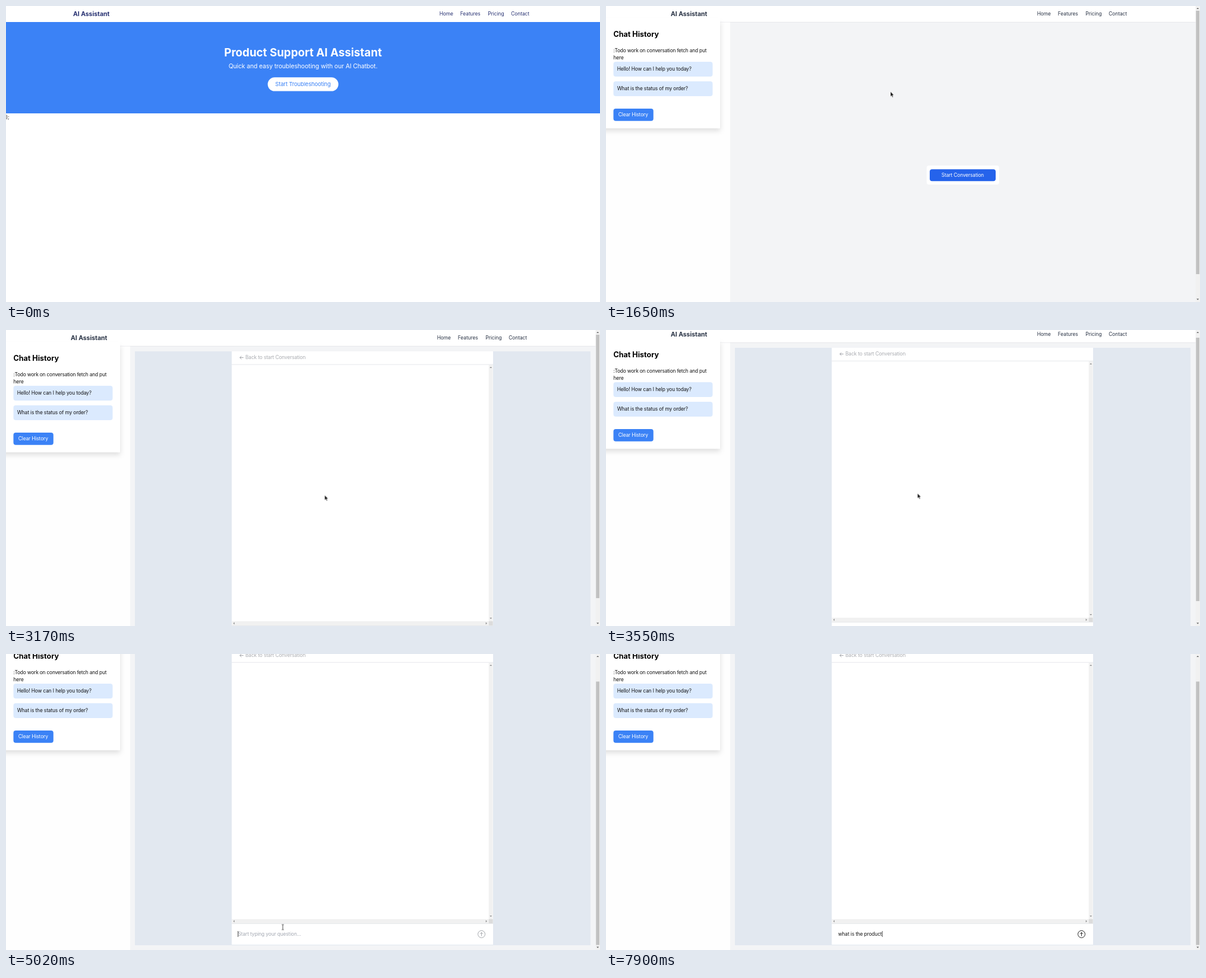
An HTML page that plays this animation: 1000 px wide and 499 px high, repeating every 8000 ms.

```html
<!DOCTYPE html>
<html lang="en">
<head>
<meta charset="utf-8">
<title>Support chat</title>
<style>
html, body { margin: 0; width: 100%; height: 100%; overflow: hidden; background: #fff; }
svg { display: block; width: 1000px; height: 499px; font: 8.33px Inter, sans-serif; letter-spacing: -.013em; }
.brand { font-size: 10.4px; font-weight: 700; letter-spacing: 0; }
.nav { letter-spacing: -.003em; }
.mid { text-anchor: middle; }
.typed { white-space: pre; }

/* one 8 s loop for everything; on/off parts switch hard */
.home, .app, .start, .chat, .idle, .busy, .hint, .caret, .cursor > g { animation: 8s step-end infinite; }
.home { animation-name: home; }
.app { animation-name: app; }
.start { animation-name: start; }
.chat { animation-name: chat; }
.idle { animation-name: idle; }
.busy { animation-name: busy; }
.hint { animation-name: hint; }
.caret { animation-name: caret; }
.cursor .arrow { animation-name: arrow; }
.cursor .hand { animation-name: hand; }
.cursor .beam { animation-name: beam; }
.press { animation: press 8s step-end infinite; }
.send { animation: send 8s step-end infinite; }
.scroll { animation: scroll 8s infinite; }
.thumb { animation: thumb 8s infinite; }
.cursor { animation: move 8s linear infinite; }
.spin { animation: spin 1s linear infinite; transform-origin: 600.5px 285.2px; }

@keyframes home { 0% { opacity: 1 } 19.25%, 100% { opacity: 0 } }
@keyframes app { 0% { opacity: 0 } 19.25%, 100% { opacity: 1 } }
@keyframes start { 0%, 37.5%, 100% { opacity: 0 } 19.25% { opacity: 1 } }
@keyframes chat { 0% { opacity: 0 } 37.5%, 100% { opacity: 1 } }
@keyframes idle { 0% { opacity: 1 } 31.75%, 100% { opacity: 0 } }
@keyframes busy { 0% { opacity: 0 } 31.75%, 100% { opacity: 1 } }
@keyframes press { 0% { fill: #2563eb } 28%, 100% { fill: #1d4ed8 } }
@keyframes hint { 0% { opacity: 1 } 74.625%, 100% { opacity: 0 } }
@keyframes send { 0% { stroke: #a5a8ad } 74.625%, 100% { stroke: #222 } }
@keyframes caret { 0%, 70.125% { opacity: 0 } 54.875%, 74.625%, 100% { opacity: 1 } }
@keyframes arrow { 0%, 10.6%, 28%, 53.5%, 100% { opacity: 0 } 2.5%, 19.25%, 37.5% { opacity: 1 } }
@keyframes hand { 0%, 19.25%, 37.5%, 100% { opacity: 0 } 10.6%, 28% { opacity: 1 } }
@keyframes beam { 0%, 54.875%, 74.625%, 100% { opacity: 0 } 53.5%, 62.75% { opacity: 1 } }
@keyframes scroll {
  0% { transform: none; animation-timing-function: step-end }
  44.375%, 45.5% { transform: translateY(-6px); animation-timing-function: ease-out }
  51.25%, 100% { transform: translateY(-44px) }
}
@keyframes thumb {
  0% { transform: none; animation-timing-function: step-end }
  44.375%, 45.5% { transform: translateY(5px); animation-timing-function: ease-out }
  51.25%, 100% { transform: translateY(38.5px) }
}
@keyframes move {
  0%, 2.5% { transform: translate(545px, 284px); animation-timing-function: ease-out }
  12.125% { transform: translate(478px, 135px) }
  15.875%, 19.25% { transform: translate(475px, 138px); animation-timing-function: ease-in-out }
  28.875%, 29.875% { transform: translate(570px, 291px) }
  31.75%, 33.875% { transform: translate(570px, 287px); animation-timing-function: ease-out }
  44.375%, 45.5% { transform: translate(524.5px, 275.5px); animation-timing-function: ease-in-out }
  51.25%, 53.5% { transform: translate(490px, 440px) }
  54.875%, 100% { transform: translate(466px, 460.5px) }
}
@keyframes spin { to { transform: rotate(360deg) } }
</style>
</head>
<body>
<svg viewBox="0 0 1000 499">
  <defs>
    <g id="menu">
      <text class="brand" x="113" y="17.2">AI Assistant</text>
      <g class="nav">
        <text x="729.7" y="16.1">Home</text>
        <text x="764.8" y="16.1">Features</text>
        <text x="811.3" y="16.1">Pricing</text>
        <text x="850.3" y="16.1">Contact</text>
      </g>
    </g>
    <path id="tip" d="M-2 1.1h4L0-1.1z"/>
  </defs>

  <g class="home">
    <rect width="1000" height="499" fill="#fff"/>
    <use href="#menu" fill="#252f70"/>
    <rect y="27" width="1000" height="154" fill="#3b82f6"/>
    <g class="mid" fill="#fff">
      <text x="500" y="85.3" font-size="18.75" font-weight="700" letter-spacing="0">Product Support AI Assistant</text>
      <text x="500" y="104.6" font-size="10.4">Quick and easy troubleshooting with our AI Chatbot.</text>
      <rect x="440.6" y="120.2" width="119" height="23.4" rx="11.7"/>
      <text x="500" y="135.4" font-size="9.4" fill="#3b82f6">Start Troubleshooting</text>
    </g>
    <text x="0" y="190" fill="#111">);</text>
  </g>

  <g class="app">
    <rect width="1000" height="499" fill="#f3f4f6"/>
    <g class="scroll">
      <rect width="993" height="27" fill="#fff"/>
      <path d="M0 27.3H993" stroke="#e2e4e8" stroke-width=".8"/>
      <use href="#menu" x="-4" fill="#283244"/>
      <rect y="27.6" width="209" height="530" fill="#fefefe"/>
      <rect x="-20" y="24" width="212" height="182.3" fill="#fff" style="filter:drop-shadow(0 4px 4px #0002)"/>
      <rect y="20" width="192" height="12" fill="#fff"/>
      <text x="12.5" y="51.8" font-size="12.5" font-weight="700" letter-spacing="0">Chat History</text>
      <g fill="#111">
        <text x="12.5" y="77.5" letter-spacing="-.17">:Todo work on conversation fetch and put</text>
        <text x="12.5" y="90">here</text>
        <g fill="#dbeafe">
          <rect x="12.5" y="94" width="167" height="25" rx="4"/>
          <rect x="12.5" y="127" width="167" height="25" rx="4"/>
        </g>
        <text x="18.7" y="109">Hello! How can I help you today?</text>
        <text x="18.7" y="142.3">What is the status of my order?</text>
      </g>
      <rect x="12.5" y="173" width="67.3" height="20.7" rx="4" fill="#3b82f6"/>
      <text x="20.8" y="186.2" fill="#fff">Clear History</text>

      <g class="start">
        <rect x="539.8" y="269" width="122" height="32" rx="4" fill="#fff"/>
        <rect class="press" x="545" y="275.2" width="111" height="20" rx="4"/>
        <text class="idle mid" x="600.5" y="288.2" fill="#fff">Start Conversation</text>
        <g class="busy">
          <g class="spin" fill="none" stroke="#fff">
            <circle cx="600.5" cy="285.2" r="2.8" opacity=".5"/>
            <path d="M597.7 285.2a2.8 2.8 0 0 1 2.8-2.8"/>
          </g>
        </g>
      </g>

      <g class="chat">
        <rect x="217" y="36" width="767" height="499" fill="#e2e8f0"/>
        <rect x="380" y="36" width="440" height="498" fill="#fff"/>
        <path d="M399.8 46.5H393.8m2.6-2.7-2.7 2.7 2.7 2.7" fill="none" stroke="#8d9096" stroke-width=".8"/>
        <text x="403" y="49.3" fill="#a9abb0">Back to start Conversation</text>
        <path d="M380 58.2H820M380 498.6H820" stroke="#e5e7eb"/>
        <path d="M812.7 59H819.6V491H812.7zM380.4 491H812.7V498H380.4z" fill="#f1f1f1"/>
        <rect x="812.7" y="491" width="7" height="7" fill="#dcdcdc"/>
        <g fill="#8f8f8f">
          <use href="#tip" x="816.2" y="63"/>
          <use href="#tip" transform="translate(816.2 486) scale(1 -1)"/>
          <use href="#tip" transform="translate(383.6 494.5) rotate(-90)"/>
          <use href="#tip" transform="translate(808.8 494.5) rotate(90)"/>
        </g>
        <text class="hint" x="390.6" y="519" fill="#a3a8b2">Start typing your question...</text>
        <text class="typed" x="390.8" y="519" fill="#111"></text>
        <rect class="caret" y="511" width=".8" height="10" fill="#222"/>
        <g class="send" fill="none">
          <circle cx="800.5" cy="516.3" r="6"/>
          <path d="M800.5 519.4V513.4m-2.4 2.4 2.4-2.4 2.4 2.4"/>
        </g>
      </g>
    </g>

    <rect x="992.5" width="7.5" height="499" fill="#f1f1f1"/>
    <rect class="thumb" x="993.3" y="8" width="5.7" height="444" fill="#c1c1c1"/>
    <g fill="#606060">
      <use href="#tip" x="996.2" y="4"/>
      <use href="#tip" transform="translate(996.2 494.6) scale(1 -1)"/>
    </g>
  </g>

  <g class="cursor">
    <g class="arrow">
      <path d="M0 0V8.2L1.9 6.5 3.2 9.4 4.5 8.8 3.2 6H5.7z" fill="#111" stroke="#fff" stroke-width=".5"/>
    </g>
    <g class="hand">
      <path d="M-1 1Q-.2-.4.6 1V3.6L3.4 4.2Q4.4 4.6 4.2 6L3.4 9.6H-.6L-3 6.4Q-3-.1.1-1 6.4z" style="display:none"/>
      <path d="M-.9.9Q-.1-.5.7.9V3.5L3.2 4.1Q4.3 4.5 4.1 5.8L3.3 9.4H-.5L-2.9 6.1Q-2.6 4.9-.9 6.2z" fill="#fff" stroke="#222" stroke-width=".8" stroke-linejoin="round"/>
    </g>
    <g class="beam">
      <path d="M-1.8-4.2H-.5L0-3.8 .5-4.2H1.8M0-3.8V3.8M-1.8 4.2H-.5L0 3.8 .5 4.2H1.8" fill="none" stroke="#222" stroke-width=".8"/>
    </g>
  </g>
</svg>
<script>
const LOOP = 8000;
const phrase = 'what is the product'.replace(/ /g, '\u00a0');
const keys = [5970, 6050, 6130, 6210, 6300, 6380, 6470, 6550, 6640, 6730, 6810, 6920,
  7180, 7260, 7410, 7490, 7570, 7660, 7830];
const typed = document.querySelector('.typed');
const caret = document.querySelector('.caret');
const begin = performance.now();
let shown = -1;

function draw() {
  const t = (performance.now() - begin) % LOOP;
  const count = keys.filter(k => k <= t).length;
  if (count !== shown) {
    shown = count;
    typed.textContent = phrase.slice(0, count);
    caret.setAttribute('x', 390.3 + (count ? typed.getComputedTextLength() + .8 : 0));
  }
  requestAnimationFrame(draw);
}
draw();
</script>
</body>
</html>
```
